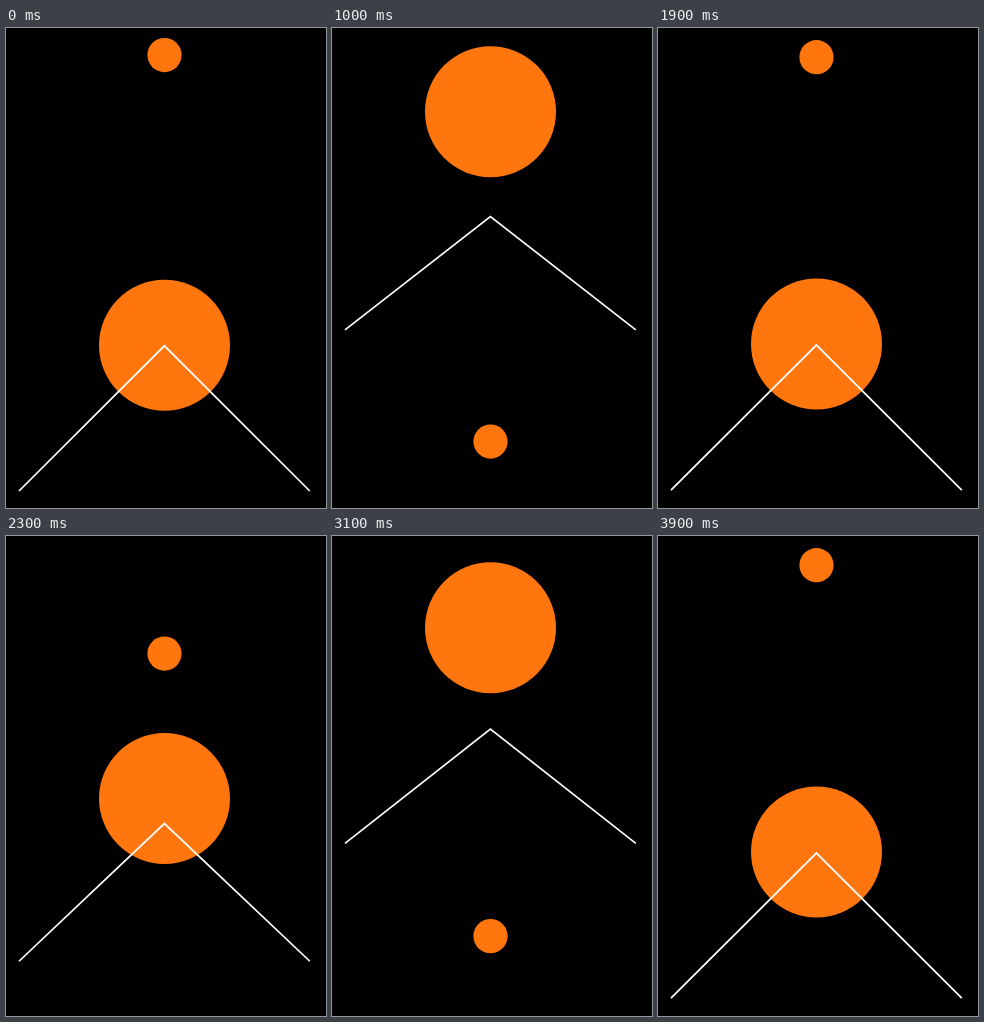
These frames come from a looping animation (320x480 px, 4000 ms). An HTML page:

```html
<!DOCTYPE html>
<html lang="en">
<head>
<meta charset="utf-8">
<title>Bouncing circles</title>
<style>
  html, body { margin: 0; width: 100%; height: 100%; overflow: hidden; background: #000; }
  svg { display: block; width: 320px; height: 480px; }
  circle { fill: #ff760e; }
  path { fill: none; stroke: #fff; stroke-width: 1.7; }
</style>
</head>
<body>
<svg viewBox="0 0 320 480">
  <circle id="big" cx="158.5" r="65.5"/>
  <circle id="small" cx="158.5" r="17.1"/>
  <path id="roof"/>
</svg>
<script>
  const [big, small, roof] = ['big', 'small', 'roof'].map(id => document.getElementById(id));
  const STEP = 100, HALF = 1000, LEAD = 36;

  const mix = (a, b, p) => a + (b - a) * p;
  const bezier = (a, b, s) => 3 * (1 - s) ** 2 * s * a + 3 * (1 - s) * s * s * b + s ** 3;

  // cubic-bezier(.42, 0, .58, 1)
  function easeInOut(x) {
    let lo = 0, hi = 1;
    for (let i = 0; i < 24; i++) {
      const mid = (lo + hi) / 2;
      if (bezier(.42, .58, mid) < x) lo = mid; else hi = mid;
    }
    return bezier(0, 1, lo);
  }

  function draw(ms) {
    const held = Math.floor((ms + 1) / STEP) * STEP;
    const phase = (held + LEAD) / HALF % 2;
    const p = easeInOut(phase < 1 ? phase : 2 - phase);
    const tip = mix(318.1, 188.3, p), foot = mix(463.4, 301.4, p);
    big.setAttribute('cy', mix(317.8, 83.1, p));
    small.setAttribute('cy', mix(26.1, 414.5, p));
    roof.setAttribute('d', `M13 ${foot} L158.4 ${tip} L303.8 ${foot}`);
  }

  function tick() {
    draw(performance.now());
    requestAnimationFrame(tick);
  }
  tick();
</script>
</body>
</html>
```
